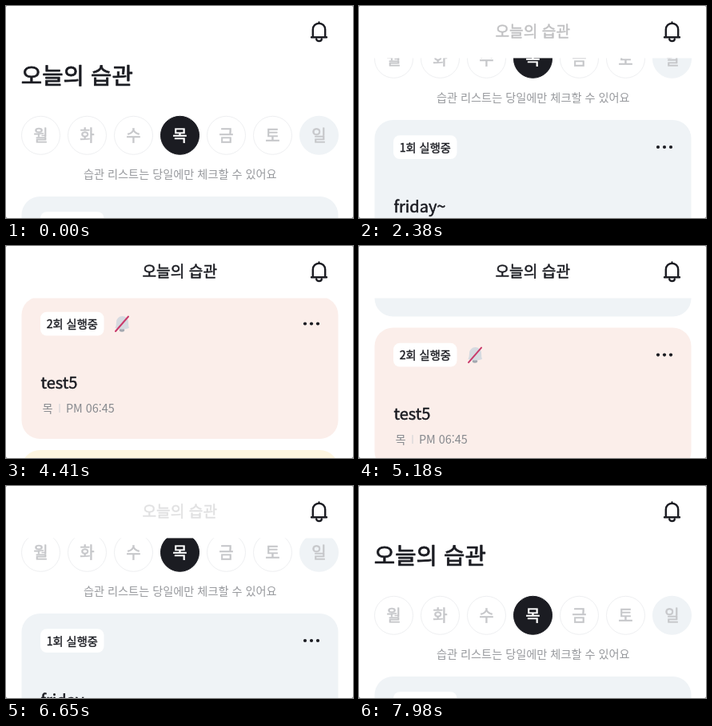
Write an HTML page that moves like this. It is 434 px wide and 266 px high and loops after 8.33 s.

```html
<!DOCTYPE html>
<html lang="ko">
<head>
<meta charset="utf-8">
<style>
  html, body { margin: 0; width: 100%; height: 100%; overflow: hidden; background: #777; }
  svg { display: block; width: 434px; height: 266px; background: #fff; border-radius: 2px; }
  text { font-family: "Noto Sans CJK KR", "Noto Sans CJK", sans-serif; color: #1b1c22; fill: currentColor; }
  /* A thin outline turns the regular weight into a medium one. */
  .medium { stroke: currentColor; stroke-width: .027em; stroke-linejoin: round; }
  .mid { text-anchor: middle; }
  .ink { fill: none; stroke: #1b1c22; stroke-width: 2.4; stroke-linecap: round; stroke-linejoin: round; }
</style>
</head>
<body>
<svg viewBox="0 0 434 266">
  <g id="list"></g>
  <rect width="434" height="65.4" fill="#fff"/>
  <text id="heading" class="medium mid" x="217.3" y="38.7" font-size="19.2">오늘의 습관</text>
  <path class="ink" d="M391.5 20.4v1.2M383.8 39V29.4a7.7 7.7 0 0 1 15.4 0V39M382 39.2H401M388.2 41.6a3.3 2.4 0 0 0 6.600 0"/>
</svg>
<script>
const LOOP = 8330, STEP = 70;

// [time in ms, scroll offset in px]
const KEYS = [
  [0, 0], [1470, 0], [2380, 96], [2870, 190], [3220, 190], [3570, 217],
  [3990, 364], [4130, 364], [4410, 368], [4970, 368], [5670, 187], [6090, 187],
  [6650, 79], [6860, 61], [7000, 61], [7140, 60], [7210, 60], [7770, 0], [LOOP, 0]
];

const label = (x, y, size, str, cls = 'medium', color = '#1b1c22') =>
  `<text x="${x}" y="${y}" font-size="${size}" class="${cls}" style="color:${color}">${str}</text>`;

const day = (name, i) => {
  const x = 43.5 + 58 * i, today = i === 3, sunday = i === 6;
  const fill = today ? '#1b1c22' : sunday ? '#eff3f6' : '#fff';
  const edge = today || sunday ? fill : '#eeeff1';
  return `<circle cx="${x}" cy="162.3" r="24" fill="${fill}" stroke="${edge}"/>` +
    label(x, 169.9, 20, name, 'medium mid', today ? '#fff' : '#c6c7ca');
};

const mutedBell = `<g transform="translate(145 34)">
  <ellipse cy="8" rx="3.2" ry="2.2" fill="#a3a8b0"/>
  <path d="M-8.5 5.5Q-7 3-7-2a7.5 7.5 0 0 1 15 0Q8 3 9 5.5Q0 8.5-8.5 5.5Z" fill="#d6dae0"/>
  <path d="M-8 9.5L8-9" stroke="#c93a6b" stroke-width="2" stroke-linecap="round"/></g>`;

const card = ({ color, badge, muted, title, days, time, bar }, i) => {
  const grey = '#85888d';
  return `<g transform="translate(0 ${239 + 192.5 * i})">
    <rect x="19.5" width="396" height="178.5" rx="23" fill="${color}"/>
    <rect x="43" y="19.2" width="79.5" height="29.8" rx="8" fill="#fff"/>
    ${label(50.7, 39.6, 14.2, badge)}
    ${muted ? mutedBell : ''}
    ${[374, 382, 390].map(x => `<circle cx="${x}" cy="34" r="2.1" fill="#1b1c22"/>`).join('')}
    ${label(43.5, 115.6, 20, title)}
    ${label(45.5, 145.4, 14.2, days, '', grey)}
    <path d="M${bar} 134.5v11" stroke="#cdd0d4"/>
    ${label(bar + 8, 145.4, 14.4, time, '', grey)}</g>`;
};

const cards = [
  { color: '#eff3f6', badge: '1회 실행중', title: 'friday~', days: '목, 금', time: 'AM 10:40', bar: 87 },
  { color: '#fbeeea', badge: '2회 실행중', muted: true, title: 'test5', days: '목', time: 'PM 06:45', bar: 67 },
  { color: '#fef6e0', badge: '1회 실행중', title: 'test4', days: '목', time: 'PM 06:40', bar: 67 }
];

const list = document.getElementById('list');
const heading = document.getElementById('heading');
list.innerHTML =
  label(18.8, 98, 28.7, '오늘의 습관') +
  [...'월화수목금토일'].map(day).join('') +
  label(217.8, 215.5, 14.2, '습관 리스트는 당일에만 체크할 수 있어요', 'mid', '#97999d') +
  cards.map(card).join('');

const slope = i => KEYS[i + 1] && KEYS[i]
  ? (KEYS[i + 1][1] - KEYS[i][1]) / (KEYS[i + 1][0] - KEYS[i][0]) : 0;

// Harmonic mean of neighbouring slopes keeps the curve monotone.
const tangent = i => {
  const a = slope(i - 1), b = slope(i);
  return a * b > 0 ? 2 * a * b / (a + b) : 0;
};

function scrollAt(t) {
  const i = KEYS.findIndex(k => k[0] > t) - 1;
  const [t0, y0] = KEYS[i], [t1, y1] = KEYS[i + 1];
  const span = t1 - t0, u = (t - t0) / span, v = 1 - u;
  return y0 * v * v * (1 + 2 * u) + y1 * u * u * (3 - 2 * u) +
    span * u * v * (v * tangent(i) - u * tangent(i + 1));
}

function draw(now) {
  const t = Math.floor(now % LOOP / STEP) * STEP;
  const y = scrollAt(t);
  list.setAttribute('transform', `translate(0 ${-y})`);
  heading.setAttribute('opacity', Math.min(1, Math.max(0, (y - 63) / 122)));
  requestAnimationFrame(draw);
}
draw(performance.now());
</script>
</body>
</html>
```
